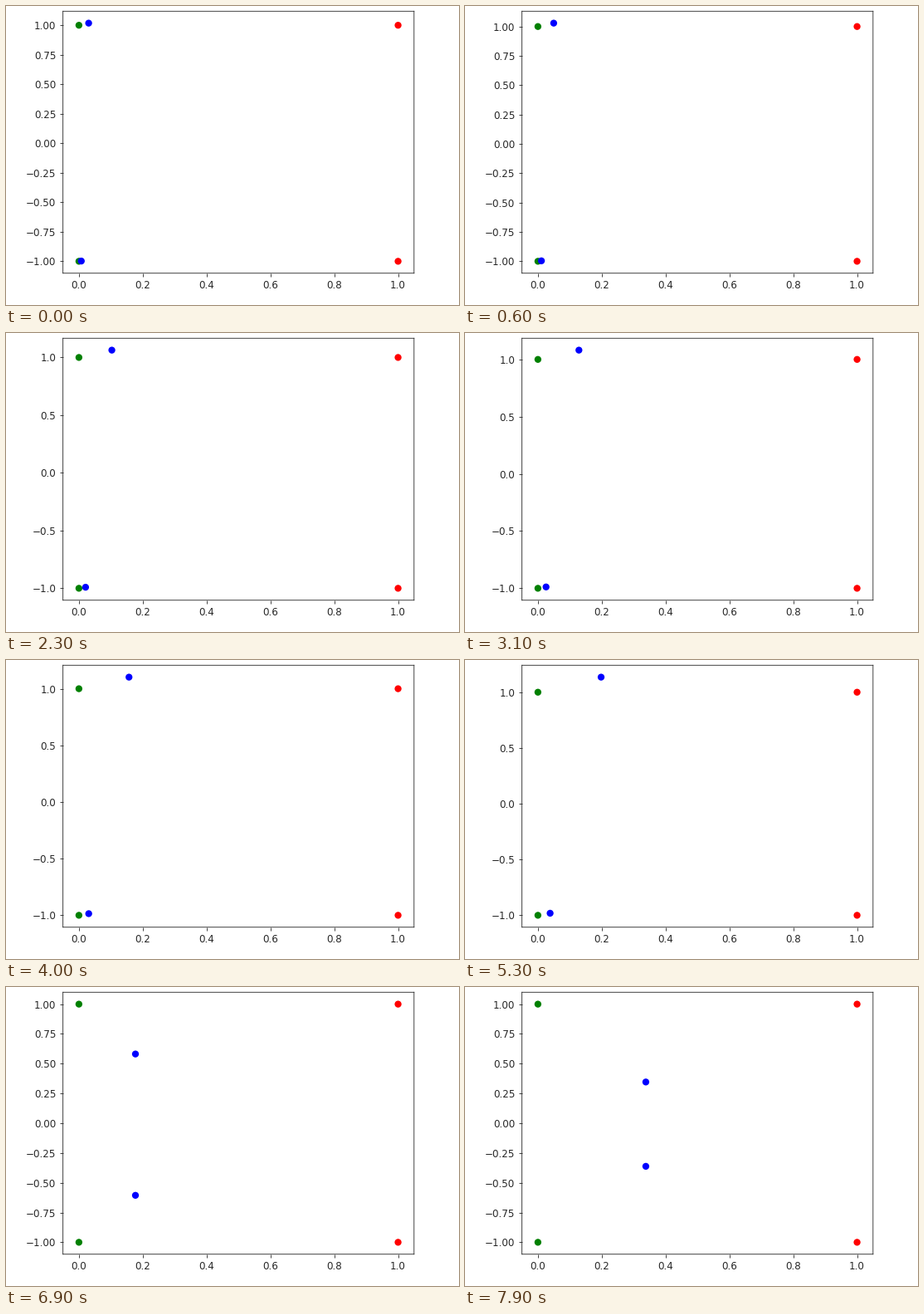
A matplotlib script that plays this animation: 546x360 px, repeating every 8 s.

```python
import numpy as np
import matplotlib.pyplot as plt
from matplotlib.animation import FuncAnimation

W, H, DPI = 546, 360, 85.3125
FRAMES, STEP = 80, 100
HOLD, RESTART = 53, 58      # first run stops, second run begins
INK = "0.15"

# Unsnapped thin strokes give the soft look of a scaled plot.
plt.rcParams.update({
    "path.snap": False,
    "axes.linewidth": 0.72, "axes.edgecolor": INK,
    "xtick.color": INK, "ytick.color": INK,
    "xtick.major.width": 0.72, "ytick.major.width": 0.72,
})

fig = plt.figure(figsize=(W / DPI + 1e-5, H / DPI + 1e-5), dpi=DPI,
                 facecolor="white")
ax = fig.add_axes([68.65 / W, 38.3 / H, 423.15 / W, 315.4 / H])
ax.set_xlim(-0.05, 1.05)

FIXED = [(1, 1), (1, -1), (0, 1), (0, -1)]
COLORS = ["red"] * 2 + ["green"] * 2 + ["blue"] * 2
dots = ax.scatter(*zip(*FIXED, (0, 1), (0, -1)), s=49, c=COLORS, linewidths=0)


def drift(t):
    """First run: slow outward drift from the left-hand points."""
    upper = 0.0305 + 0.00316 * t, 1.0178 + 0.0018 * t + 7.8e-6 * t**2
    lower = 0.0075 + 0.00058 * t, -0.998 + 0.00031 * t
    return [upper, lower]


def converge(k):
    """Second run: steady advance while both heights decay to zero."""
    x = 0.0161 * k
    upper = x, np.exp(-0.048 * k - 0.00012 * k**2)
    lower = x, -np.exp(-0.0425 * k - 0.00028 * k**2)
    return [upper, lower]


def update(i):
    movers = drift(min(i, HOLD)) if i < RESTART else converge(i - RESTART)
    points = np.array(FIXED + movers)
    dots.set_offsets(points)
    low, high = points[:, 1].min(), points[:, 1].max()
    pad = 0.05 * (high - low)
    ax.set_ylim(low - pad, high + pad)
    return dots,


anim = FuncAnimation(fig, update, frames=FRAMES, interval=STEP,
                     init_func=lambda: update(0), repeat=True,
                     repeat_delay=0, blit=False)
plt.show()
```
